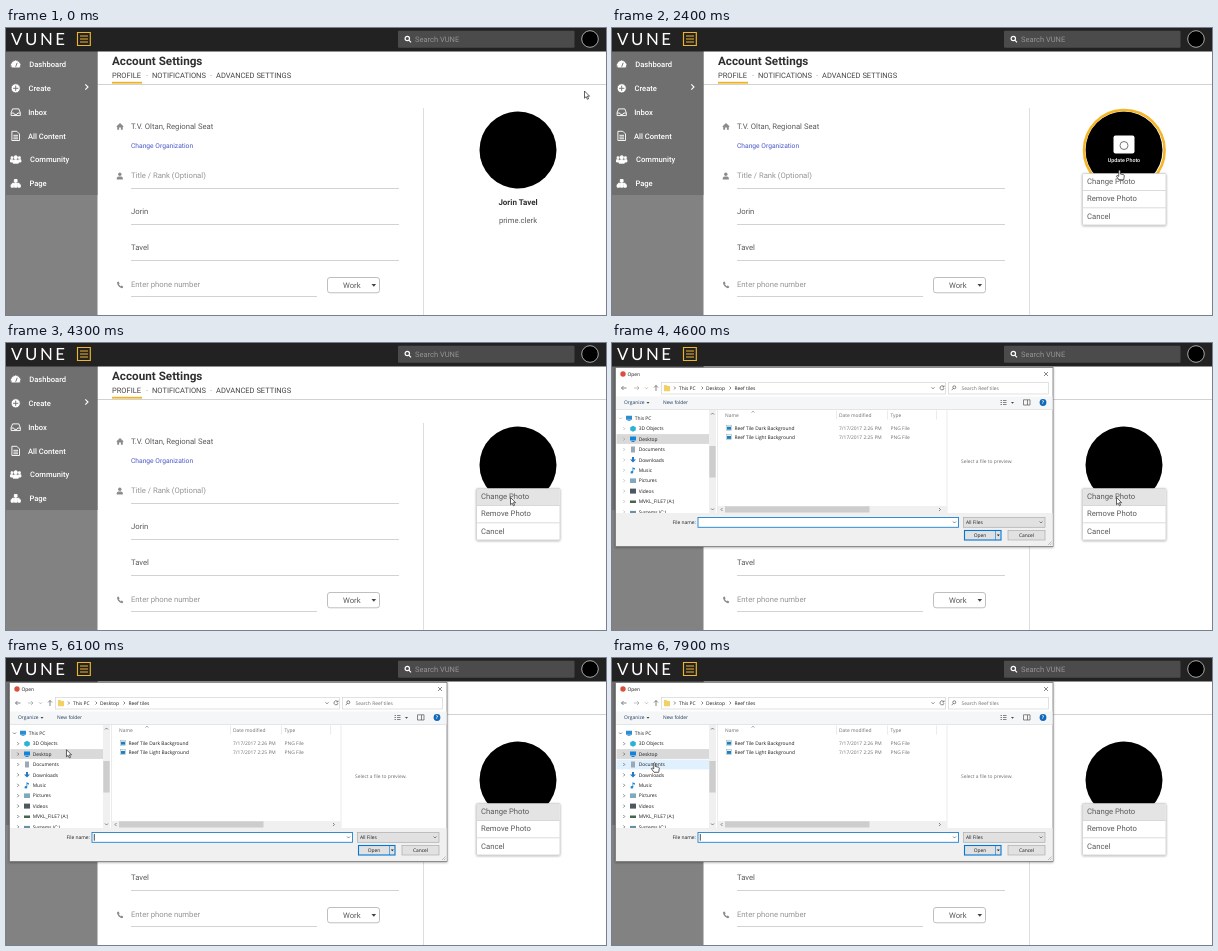
Write an HTML page that moves like this. It is 600 by 287 pixels and loops after 8000 ms.

```html
<!DOCTYPE html>
<html lang="en">
<head>
<meta charset="utf-8">
<title>Account settings</title>
<style>
  html, body { margin: 0; height: 100%; overflow: hidden; background: #fff; }
  svg { display: block; width: 100vw; height: 100vh; text-rendering: geometricPrecision; }
  text { font: 7.7px Roboto, sans-serif; fill: #5a5a5a; white-space: pre; }
  .brand { font: 400 16.8px Lato, sans-serif; letter-spacing: 2.6px; fill: #fff; }
  .title { font-size: 11.7px; font-weight: 700; fill: #303030; }
  .tab { font-size: 7.5px; fill: #444; }
  .hint { fill: #959595; }
  .link { font-size: 6.7px; fill: #4a58c8; }
  .nav { font-size: 7.6px; font-weight: 500; fill: #fff; }
  .name { font-size: 8px; font-weight: 700; fill: #303030; }
  .mid { text-anchor: middle; }
  .rule { stroke: #d2d2d2; stroke-width: 1; }
  #dialog text { font: 4.9px "Open Sans", sans-serif; fill: #1a1a1a; }
  #dialog .soft { fill: #6d6d6d; }
  #dialog .tool { fill: #1e395b; }
  .thin { fill: none; stroke: #555; stroke-width: .7; }
  .box { fill: #fff; stroke: #d5d5d5; stroke-width: .7; }
  .button { fill: #e1e1e1; stroke: #adadad; stroke-width: .7; }
</style>
</head>
<body>
<svg viewBox="0 0 600 287" preserveAspectRatio="none">
  <defs>
    <filter id="shadow" x="-10%" y="-10%" width="120%" height="125%">
      <feDropShadow dx="0" dy=".7" stdDeviation=".9" flood-opacity=".35"/>
    </filter>
    <clipPath id="treeClip"><rect x="4" y="67" width="93" height="103"/></clipPath>
  </defs>

  <rect width="600" height="287" fill="#fff"/>
  <path class="rule" d="M91 56.500H600"/>

  <!-- sidebar -->
  <rect y="23" width="91.500" height="264" fill="#828282"/>
  <rect y="23" width="91.500" height="144" fill="#6f6f6f"/>
  <g id="sidebar"></g>
  <path d="M79.300 56.300l2.700 2.700-2.700 2.700" fill="none" stroke="#fff" stroke-width="1.100"/>

  <!-- header -->
  <rect width="600" height="23.500" fill="#222"/>
  <text class="brand" x="5" y="17">VUNE</text>
  <path d="M71.500 4.500h12.800v13h-12.800zM74 8h8M74 11h8M74 14h8" fill="none" stroke="#f0b429" stroke-width="1.150"/>
  <rect x="392" y="2.700" width="176.500" height="17" rx="1" fill="#4b4b4b"/>
  <g fill="none" stroke="#fff" stroke-width="1.200"><circle cx="401.300" cy="10.500" r="2.200"/><path d="M402.800 12.200l2.200 2.200"/></g>
  <text x="409" y="13.500" style="fill:#949494;font-size:7.500px">Search VUNE</text>
  <circle cx="584" cy="11" r="8.300" stroke="#ccc" stroke-width=".8"/>

  <!-- page title and tabs -->
  <text class="title" x="106" y="36.900">Account Settings</text>
  <text class="tab" x="106" y="50">PROFILE</text>
  <text class="tab" x="146" y="50">NOTIFICATIONS</text>
  <text class="tab" x="210" y="50">ADVANCED SETTINGS</text>
  <g fill="#aaa"><circle cx="141" cy="47.500" r=".6"/><circle cx="205" cy="47.500" r=".6"/></g>
  <rect x="106" y="53.800" width="30" height="1.800" fill="#f0b323"/>

  <!-- form -->
  <g fill="#8c8c8c">
    <path d="M110.300 98.500L114 95l3.700 3.500-.9.500v2.700h-1.900v-2.200h-1.800v2.200h-1.900v-2.700z"/>
    <circle cx="113.800" cy="146.300" r="1.700"/><path d="M110.800 151.500v-1.300q0-1.800 1.800-1.800h2.400q1.800 0 1.800 1.800v1.300z"/>
    <path d="M111.200 254l1.400-.6 1 2-.8.800 1.900 2 1-.7 1.600 1.200-.6 1.400c-2.800.7-6.300-3.300-5.500-6.100z"/>
  </g>
  <text x="125" y="101">T.V. Oltan, Regional Seat</text>
  <text class="link" x="125" y="120">Change Organization</text>
  <text class="hint" x="125" y="150">Title / Rank (Optional)</text>
  <text x="125" y="186">Jorin</text>
  <text x="125" y="222">Tavel</text>
  <text class="hint" x="125" y="259">Enter phone number</text>
  <path class="rule" d="M125 160.500H393M125 196.500H393M125 232.500H393M125 268.500H311"/>
  <rect x="321.500" y="249.500" width="52" height="15.300" rx="2.500" fill="#fff" stroke="#b8b8b8" stroke-width=".9"/>
  <text x="337" y="260">Work</text>
  <path d="M365.500 256h4.600l-2.300 2.700z" fill="#444"/>
  <path d="M417.500 80V287" stroke="#dedede"/>

  <!-- profile photo -->
  <circle cx="512" cy="122" r="38.500"/>
  <g id="hover">
    <circle cx="512.300" cy="122.300" r="40.300" fill="none" stroke="#f5b526" stroke-width="2.600"/>
    <rect x="501.500" y="107.500" width="21" height="18" rx="2" fill="#fff"/>
    <circle cx="512" cy="117.500" r="4" fill="#fff" stroke="#777" stroke-width="1"/>
    <text class="mid" x="512" y="133.500" style="fill:#fff;font-size:5.300px;font-weight:500">Update Photo</text>
  </g>
  <text class="name mid" x="512" y="177">Jorin Tavel</text>
  <text class="mid" x="512" y="195.300">prime.clerk</text>

  <g id="menu">
    <rect x="470.500" y="145.500" width="83.500" height="51.500" rx="1" fill="#fff" stroke="#c4c4c4" stroke-width=".6" filter="url(#shadow)"/>
    <rect id="menuHover" x="471" y="146" width="82.700" height="16.500" fill="#e4e4e4"/>
    <path d="M471 162.500h82.700M471 179.800h82.700" stroke="#d2d2d2" stroke-width=".8"/>
    <text x="475" y="156">Change Photo</text>
    <text x="475" y="173.300">Remove Photo</text>
    <text x="475" y="190.500">Cancel</text>
  </g>

  <!-- file dialog -->
  <g id="dialog">
    <rect x="3.500" y="24.500" width="437.500" height="179" fill="#fff" stroke="#777" stroke-width=".8" filter="url(#shadow)"/>
    <circle cx="11" cy="31" r="2.700" fill="#d9503f"/>
    <text x="15.500" y="33">Open</text>
    <path class="thin" d="M432 29l4 4m0-4l-4 4"/>
    <path class="thin" d="M14.500 45h-5l2-2m-2 2l2 2M44 48v-5.500l-2 2m2-2l2 2"/>
    <path class="thin" d="M22 45h5l-2-2m2 2l-2 2M33 44.300l1.500 1.500 1.500-1.500" stroke-opacity=".5"/>
    <rect class="box" x="49.500" y="39.500" width="284" height="11.500"/>
    <path d="M52 42h2.500l.8 1H58v5.200h-6z" fill="#f4cf64"/>
    <path class="thin" d="M62 43.500l1.500 1.500-1.500 1.500M89.500 43.500L91 45l-1.500 1.500M117.500 43.500L119 45l-1.500 1.500M319.500 44.300l1.500 1.500 1.500-1.500M331.500 43.500a2 2 0 1 0 .5 1.600M332 42.500v1.500h-1.500"/>
    <text x="67" y="46.800">This PC</text>
    <text x="94" y="46.800">Desktop</text>
    <text x="122.500" y="46.800">Reef tiles</text>
    <rect class="box" x="336.500" y="39.500" width="100" height="11.500"/>
    <circle class="thin" cx="342.300" cy="44.300" r="1.500"/><path class="thin" d="M341.200 45.500l-1.500 1.700"/>
    <text class="soft" x="349.500" y="46.800">Search Reef tiles</text>

    <rect x="4" y="53.500" width="436.500" height="13" fill="#f5f6f7"/>
    <path d="M4 66.500h436.500" stroke="#ddd" stroke-width=".7"/>
    <text class="tool" x="12" y="61.300">Organize</text>
    <path d="M34.500 59h3l-1.500 1.800zM399 59h3l-1.500 1.800z" fill="#444"/>
    <text class="tool" x="51" y="61.300">New folder</text>
    <path class="thin" d="M388.500 57.500h1.500m1 0h3.500M388.500 59.500h1.500m1 0h3.500M388.500 61.500h1.500m1 0h3.500M411.500 56.800h6.500v5.200h-6.500zM415.500 57v5"/>
    <circle cx="431" cy="59.500" r="3.400" fill="#1168b8"/>
    <text class="mid" x="431" y="61.300" style="fill:#fff;font-weight:700">?</text>

    <g clip-path="url(#treeClip)">
      <rect x="4.500" y="91.100" width="92.500" height="9.800" fill="#d9d9d9"/>
      <rect id="treeHover" x="4.500" width="92.500" height="9.800" fill="#e0f0fd"/>
      <g id="tree"></g>
    </g>
    <rect x="97" y="67" width="7" height="103" fill="#f0f0f0"/>
    <rect x="97.300" y="103" width="6.400" height="31.500" fill="#cdcdcd"/>
    <path class="thin" d="M99 71.500l1.500-1.500 1.500 1.500M99 165.500l1.500 1.500 1.500-1.500"/>
    <path d="M105.500 67V170M224.500 67.500v9M275.500 67.500v9M324.500 67.500v9M335 67V170" stroke="#e3e3e3" stroke-width=".7"/>

    <path class="thin" d="M139.500 69.500l1.500-1.300 1.500 1.300" stroke-opacity=".7"/>
    <text class="soft" x="113" y="74">Name</text>
    <text class="soft" x="227" y="74">Date modified</text>
    <text class="soft" x="278.500" y="74">Type</text>
    <g id="files"></g>
    <text class="soft" x="349" y="120.300">Select a file to preview.</text>
    <rect x="106" y="163" width="229" height="7" fill="#f0f0f0"/>
    <rect x="113" y="163.300" width="144.500" height="6.200" fill="#cdcdcd"/>
    <path class="thin" d="M110.500 165l-1.500 1.500 1.500 1.500M327 165l1.500 1.500-1.500 1.500"/>

    <rect x="4" y="170" width="436.600" height="33" fill="#f0f0f0"/>
    <text x="60.500" y="181">File name:</text>
    <rect x="86" y="174.500" width="260.500" height="9.800" fill="#fff" stroke="#1e82d2" stroke-width=".9"/>
    <path id="caret" d="M88.300 176v6.700" stroke="#000" stroke-width=".7"/>
    <rect class="button" x="351.500" y="174.500" width="81.500" height="9.800"/>
    <text x="354" y="181">All Files</text>
    <path class="thin" d="M341 178.500l1.500 1.500 1.500-1.500M427.500 178.500l1.500 1.500 1.500-1.500"/>
    <rect x="352.500" y="187.500" width="36.500" height="9.500" fill="#e1e1e1" stroke="#0078d7" stroke-width="1.100"/>
    <path d="M383.500 188v9" stroke="#0078d7" stroke-width=".6"/>
    <path d="M384.800 191.500h3l-1.500 1.800z" fill="#222"/>
    <text class="mid" x="368" y="194">Open</text>
    <rect class="button" x="396" y="187.500" width="37" height="9.500"/>
    <text class="mid" x="414.500" y="194">Cancel</text>
    <path d="M436 202l3.500-3.500M438 202l1.500-1.500" stroke="#aaa" stroke-width=".7"/>
  </g>

  <g id="cursor" fill="#fff" stroke="#222" stroke-width=".7" stroke-linejoin="round">
    <path id="arrow" d="M0 0v7.200l1.700-1.500 1.200 2.600 1.200-.6-1.200-2.500h2.200z"/>
    <path id="hand" d="M-.8.800q.8-1.300 1.600 0v3.200l3.200.7q.9.300.8 1.300l-.6 3.800h-4.700l-2.600-3.600q.3-1.200 1.500-.4l.8.600z"/>
  </g>
</svg>

<script>
const $ = id => document.getElementById(id);
const LOOP = 8000, MENU_OPEN = 2250, DIALOG_OPEN = 4600;
const ROW_TOP = 75.3, ROW_STEP = 10.4;

// Sidebar entries: label, text x, icon fill, icon stroke, icon path
const WHITE = "#fff", GREY = "#6f6f6f";
const sidebar = [
  ["Dashboard", 23.3, WHITE, GREY, "M-3.700 3a4.400 4.400 0 1 1 7.400 0zM0 2l1.300-3.500"],
  ["Create", 22.5, WHITE, GREY, "M-4 0a4 4 0 1 0 8 0a4 4 0 1 0-8 0M-2.300 0h4.600M0-2.300v4.600"],
  ["Inbox", 22.2, "none", WHITE, "M-4 .5l1.300-3.300h5.400l1.300 3.300v2.500h-8zM-4 .8h2.200l.7 1.200h2.200l.7-1.200h2.200"],
  ["All Content", 22, "none", WHITE, "M-3.300-4h4.300l2.300 2.300v5.700h-6.600zM-2-.5h4M-2 1h4M-2 2.500h4"],
  ["Community", 24, WHITE, WHITE, "M-1.500-2a1.500 1.500 0 1 1 3 0a1.500 1.500 0 1 1-3 0M-2.300 3v-1.500q0-1.500 2.300-1.500t2.300 1.500v1.500zM-4-2.500h1.500v1.500h-1.500zM2.500-2.500h1.500v1.500h-1.500zM-4.500 0h2v2h-2zM2.500 0h2v2h-2z"],
  ["Page", 23.4, WHITE, WHITE, "M-1.200-3.500h2.400v2.200h-2.400zM-4 1h2.200v2.200h-2.200zM-1.100 1h2.200v2.200h-2.200zM1.800 1h2.200v2.200h-2.200zM0-1.500v2.500M-3 1v-1.200h6v1.200"]
];
$("sidebar").innerHTML = sidebar.map(([label, x, fill, stroke, path], i) => {
  const y = 36.5 + i * 23.8;
  return `<path transform="translate(9.700 ${y}) scale(1.150)" d="${path}" fill="${fill}" stroke="${stroke}" stroke-width=".8"/>
    <text class="nav" x="${x}" y="${y + 2.7}">${label}</text>`;
}).join("");

const monitor = "M-3-2.500h6v4h-6zM-1.500 2h3v.8h-3z", sheet = "M-2-3h4v6h-4z";
const tree = [
  ["This PC", "#2c8ed0", monitor],
  ["3D Objects", "#2bb3d6", "M0-3l2.800 1.500v3L0 3l-2.800-1.500v-3z"],
  ["Desktop", "#1583d8", monitor],
  ["Documents", "#9aa9b5", sheet],
  ["Downloads", "#2479c4", "M-1-3h2v2.500h2L0 2.500l-3-3h2z"],
  ["Music", "#2387d4", "M-.5-3l2.500 1v1.500l-1.700-.7v3.200a1.400 1.300 0 1 1-.8-1.200z"],
  ["Pictures", "#7fa9bd", "M-3-2.300h6v4.600h-6z"],
  ["Videos", "#4d5860", "M-3-2.500h6v5h-6z"],
  ["MVKL_FILE7 (A:)", "#4a6350", "M-3-1h6v2.500h-6z"],
  ["Systems (C:)", "#6b8fa8", "M-3-1h6v2.500h-6z"]
];
$("tree").innerHTML = tree.map(([label, color, path], i) => {
  const y = ROW_TOP + i * ROW_STEP, indent = i ? 4 : 0;
  const chevron = i ? `M11.300 ${y - 1.5}l1.500 1.500-1.500 1.500` : `M7 ${y - .8}l1.500 1.500 1.500-1.500`;
  return `<path class="thin" d="${chevron}"/>
    <path transform="translate(${17 + indent} ${y})" d="${path}" fill="${color}"/>
    <text x="${22.7 + indent}" y="${y + 1.7}">${label}</text>`;
}).join("");

$("files").innerHTML = [["Dark", "2:26"], ["Light", "2:25"]].map(([tone, time], i) => {
  const y = 86.5 + i * 9.2;
  return `<rect x="114.500" y="${y - 4.3}" width="5" height="5" fill="#fff" stroke="#8aa" stroke-width=".5"/>
    <rect x="115" y="${y - 2.8}" width="4" height="3" fill="#1f7fc4"/>
    <text x="122.500" y="${y}">Reef Tile ${tone} Background</text>
    <text class="soft" x="227" y="${y}">7/17/2017 ${time} PM</text>
    <text class="soft" x="278.500" y="${y}">PNG File</text>`;
}).join("");

// Pointer tip: time, x, y
const route = [
  [0, 578.5, 63], [400, 578.5, 63], [1200, 486, 142], [1500, 486, 142],
  [2100, 507.5, 142], [2700, 507.5, 142], [3300, 504.5, 154.5], [4650, 504.5, 154.5],
  [5500, 67.5, 82.5], [5700, 67.5, 82.5], [6700, 47.5, 108.5], [7100, 47.5, 108.5],
  [7700, 42.5, 104.5], [LOOP, 42.5, 104.5]
];
function pointerAt(t) {
  const i = route.findIndex(p => p[0] > t);
  const [t0, x0, y0] = route[i - 1], [t1, x1, y1] = route[i];
  const u = (t - t0) / (t1 - t0), k = u * u * (3 - 2 * u);
  return [x0 + (x1 - x0) * k, y0 + (y1 - y0) * k];
}
const show = (id, on) => $(id).style.display = on ? "" : "none";

function draw(t) {
  const [x, y] = pointerAt(t);
  const menu = t >= MENU_OPEN, dialog = t >= DIALOG_OPEN;
  const onPhoto = !dialog && Math.hypot(x - 512, y - 122) < 39 && !(menu && y > 145);
  const row = Math.round((y - ROW_TOP) / ROW_STEP);
  const handShown = onPhoto || t >= 6200;

  show("hover", onPhoto);
  show("menu", menu);
  show("menuHover", dialog || (y > 145 && y < 163));
  show("dialog", dialog);
  show("treeHover", x < 97 && row !== 2);
  $("treeHover").setAttribute("y", ROW_TOP + row * ROW_STEP - 4.9);
  $("tree").style.strokeOpacity = t < 5800 ? .45 : 1;
  show("caret", (t - DIALOG_OPEN + 1030) % 1060 < 530);
  show("arrow", !handShown);
  show("hand", handShown);
  $("cursor").setAttribute("transform", `translate(${x} ${y})`);
}

function tick() {
  const t = performance.now() % LOOP;
  draw(Math.floor(t / 100) * 100);
  requestAnimationFrame(tick);
}
tick();
</script>
</body>
</html>
```
